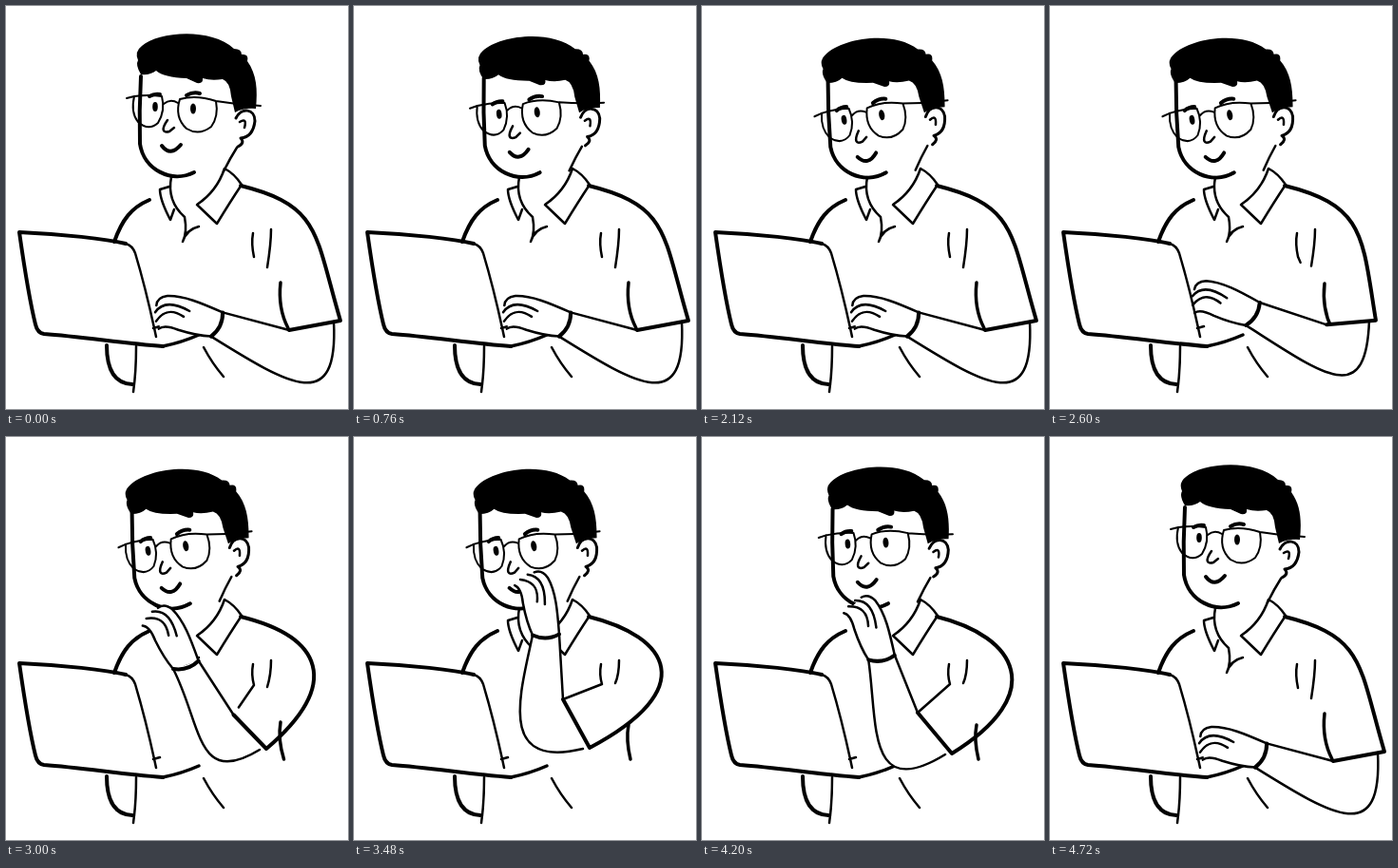
Recreate the animation shown at these times as an HTML page. Size 360 by 424 pixels, loop 5 s.

```html
<!DOCTYPE html>
<html lang="en">
<head>
<meta charset="utf-8">
<title>Thinking at the laptop</title>
<style>
html, body { margin: 0; width: 100%; height: 100%; overflow: hidden; background: #fff; }
svg { display: block; }
path { fill: none; stroke: #000; stroke-width: 2.5; stroke-linecap: round; stroke-linejoin: round; }
.thin { stroke-width: 2; }
.bold { stroke-width: 4; }
.blank { fill: #fff; stroke: none; }
.solid { fill: #000; stroke: none; }
</style>
</head>
<body>
<svg width="360" height="424" viewBox="0 0 360 424">
  <g id="laptop">
    <path class="bold" d="M126,250 C105,245 60,240 14,238 C20,280 26,315 31,335 Q33,344 40,345 C80,348 125,355 165,358"/>
    <path d="M126,250 Q133,252 136,260 C148,300 153,325 158,348 M155,339 L162,337"/>
    <path style="stroke-width:3.5" d="M165,358 Q185,354 203,346"/>
  </g>
  <g id="shirt">
    <path class="bold" d="M151,204 C132,212 122,225 114,248 M106,357 Q106,397 133,398"/>
    <path d="M137,358 Q137,385 134,406 M208,359 Q217,376 229,390"/>
    <path d="M174,180 Q169,205 188,222 Q191,238 186,248 Q190,235 203,232 M172,190 L162,193 Q162,204 173,225 L177,214"/>
    <path d="M230,171 Q240,176 248,188 Q236,206 222,229 L201,209 Q222,195 230,171"/>
  </g>
  <g id="jaw">
    <path class="bold" d="M142,74 Q140,110 141,145 C145,172 174,187 198,175"/>
    <path d="M243,149 Q236,160 229,174"/>
  </g>
  <path id="hair" class="solid" d="M142,72 Q136,62 139,57 Q135,48 143,42 C160,27 215,22 240,45 Q248,45 248,51 Q256,50 254,58 C264,72 265,88 263,108 Q250,107 241,112 L237,95 Q236,80 228,77 Q216,79 207,76 Q208,82 201,81 L190,76 Q166,75 158,68 Q152,73 142,72Z"/>
  <g id="face">
    <path class="thin" d="M127,97 L135,95 Q150,93 164,95 Q168,110 160,123 Q150,132 139,122 Q131,112 135,95 M166,103 Q173,97 181,102"/>
    <path class="thin" d="M268,105 Q245,104 221,100 Q200,93 183,98 Q177,117 190,129 Q203,137 216,127 Q224,116 221,100"/>
    <path class="bold" d="M151,95 Q156,92 162,93 M190,94 Q197,90 204,92 M164,147 Q173,159 184,146"/>
    <path d="M170,120 C163,130 165,134 172,132 L177,128 M246,122 Q254,117 251,128"/>
    <path style="stroke-width:3" d="M242,118 C248,106 262,108 262,121 Q260,138 247,139 Q252,144 244,148"/>
    <ellipse cx="157" cy="106" rx="2.8" ry="5"/>
    <ellipse cx="197" cy="108" rx="3" ry="5.5"/>
  </g>
  <path id="side" style="stroke-width:3.5"/>
  <path id="forearmFill" class="blank"/>
  <path id="forearm"/>
  <g id="hand">
    <path class="blank" d="M14,0 C13,-25 12,-45 4,-60 Q-2,-69 -10,-66 L-30,-52 Q-23,-47 -22,-32 Q-19,-14 -14,0Z"/>
    <path d="M14,0 C13,-25 12,-45 4,-60 Q-2,-69 -10,-66 M0,-32 C1,-50 -3,-62 -17,-64 M-8,-35 C-6,-50 -12,-57 -25,-59 M-31,-53 Q-24,-50 -23,-34 Q-20,-14 -14,0"/>
    <path class="bold" d="M14,0 Q0,7 -14,0"/>
  </g>
  <path id="sleeve" class="bold"/>
  <path id="creases"/>
</svg>
<script>
const LOOP = 5000, STEP = 40;
const el = id => document.getElementById(id);
const draw = (id, d) => el(id).setAttribute('d', d);
const transform = (id, value) => el(id).setAttribute('transform', value);

const lerp = (a, b, k) => a + (b - a) * k;
const mix = (a, b, k) => a.map((v, i) => lerp(v, b[i], k));
const ease = (t, from, to) => {
  const k = Math.min(1, Math.max(0, (t - from) / (to - from)));
  return (1 - Math.cos(Math.PI * k)) / 2;
};

// Joints of the arm; bend and elbow are curve handles of sleeve and forearm.
const poses = {
  typing: { wrist: [222, 335], angle: [-64], outer: [352, 331], inner: [298, 341], bend: [325, 240], under: [300, 400], elbow: [350, 430] },
  mouth: { wrist: [202, 208], angle: [-2], outer: [248, 327], inner: [220, 276], bend: [365, 265], under: [175, 270], elbow: [150, 350] },
  chin: { wrist: [189, 232], angle: [-10], outer: [263, 333], inner: [227, 290], bend: [365, 270], under: [185, 300], elbow: [173, 385] }
};
const blend = (a, b, k) =>
  Object.fromEntries(Object.keys(a).map(joint => [joint, mix(a[joint], b[joint], k)]));

// Turn a part about its pivot while it shifts.
function tilt(id, k, degrees, dx, dy, x, y) {
  transform(id, `translate(${dx * k} ${dy * k}) rotate(${degrees * k} ${x} ${y})`);
}

function drawArm(lift, slide) {
  const { wrist, angle, outer, inner, bend, under, elbow } =
    blend(poses.typing, blend(poses.mouth, poses.chin, slide), lift);
  wrist[0] -= 25 * Math.sin(Math.PI * lift);
  const turn = angle[0] * Math.PI / 180;
  const cuff = side => [wrist[0] + side * 14 * Math.cos(turn), wrist[1] + side * 14 * Math.sin(turn)];
  const end = [outer[0] - 7, outer[1] + 1];
  const underside = `M${cuff(-1)} C${under} ${elbow} ${end}`;
  const fold = [261, 264 - 4 * lift];

  transform('hand', `translate(${wrist}) rotate(${angle})`);
  draw('forearmFill', `${underside} L${inner} L${cuff(1)}Z`);
  draw('forearm', `${underside} M${cuff(1)} L${inner}`);
  draw('sleeve', `M247,189 C332,210 ${bend} ${outer} L${inner}`);
  draw('side', `M289,${291 + 12 * lift} Q286,318 ${297 - 6 * lift},339`);
  draw('creases', `M260,239 Q258,250 ${fold} L${mix(fold, inner, lift)} M279,235 Q279,250 275,${275 - 16 * lift}`);
}

function frame(now) {
  const t = Math.floor(now % LOOP / STEP) * STEP;
  const nod = ease(t, 480, 1000) - ease(t, 3920, 4460);
  tilt('hair', nod, -5, -11, 4, 200, 65);
  tilt('jaw', nod, -3, -4, 1, 185, 179);
  tilt('face', nod, -10.2, -6.5, 10.5, 175, 113);
  drawArm(ease(t, 2440, 3280) - ease(t, 4240, 4720), ease(t, 3600, 4160));
  requestAnimationFrame(frame);
}
requestAnimationFrame(frame);
</script>
</body>
</html>
```
